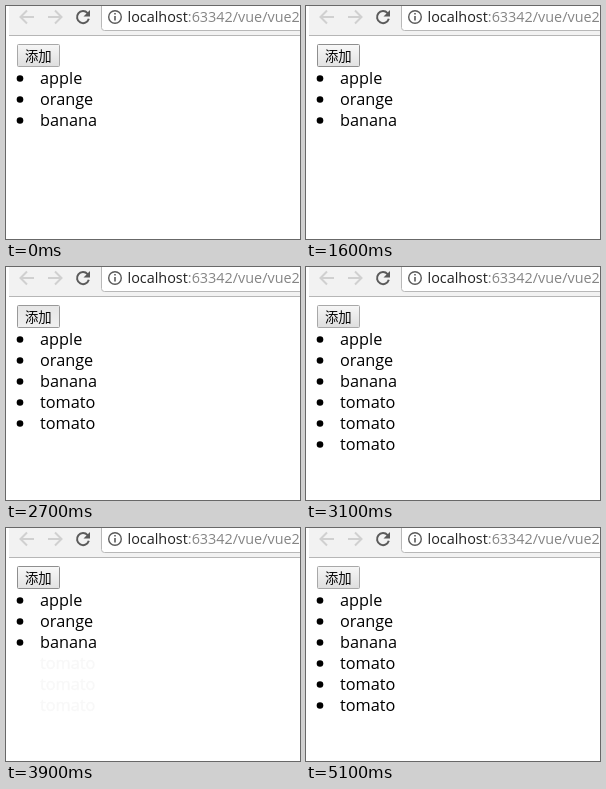
These frames come from a looping animation (294 by 233 pixels, 5.7 s). An HTML page:

```html
<!DOCTYPE html>
<html lang="zh-CN">
<head>
<meta charset="utf-8">
<title>List demo</title>
<style>
  html, body { margin: 0; width: 100%; height: 100%; overflow: hidden; background: #fff; }
  svg { display: block; width: 294px; height: 233px; }
  .url { font: 14.4px "Open Sans", "Noto Sans", sans-serif; }
  .item { font: 16.3px "Open Sans", "Noto Sans", sans-serif; }
  .label { font: 300 13.33px "Noto Sans CJK SC", "Noto Sans CJK", sans-serif; }
  .ghost { fill: #f7f7f7; stroke: #f9f9f9; stroke-width: .6; }
  .line { fill: none; stroke-width: 2; }
</style>
</head>
<body>
<svg viewBox="0 0 294 233">
  <defs>
    <linearGradient id="face" x2="0" y2="1">
      <stop id="faceTop"/>
      <stop id="faceBottom" offset="1"/>
    </linearGradient>
  </defs>

  <rect x="3" width="291" height="29" fill="#f2f2f2"/>
  <circle id="ripple" cx="77" cy="11"/>
  <path d="M3 29.5H294" stroke="#b6b6b6"/>
  <g class="line" stroke="#d0d0d0">
    <path d="M28 11H15M21 4.5L14.5 11L21 17.5"/>
    <path d="M42 11H55M49 4.5L55.5 11L49 17.5"/>
  </g>
  <path class="line" stroke="#5a5a5a" d="M81.6 7.2A6 6 0 1 0 82.8 12.8"/>
  <path fill="#5a5a5a" d="M84 4V10.5H77.5Z"/>
  <rect x="95.5" y="-6.5" width="210" height="31" rx="3" fill="#fff" stroke="#b8b8b8"/>
  <circle cx="109" cy="11" r="6.3" fill="none" stroke="#5a5a5a" stroke-width="1.4"/>
  <path d="M109 10V14.5M109 7V8.6" stroke="#5a5a5a" stroke-width="1.6"/>
  <text class="url" x="121.5" y="16" fill="#222">localhost<tspan fill="#858585">:63342/vue/vue2</tspan></text>

  <rect id="button" x="11.5" y="38.5" width="42" height="22" rx="1" fill="url(#face)"/>
  <text class="label" x="19" y="54.5">添加</text>
  <g id="list"></g>
</svg>
<script>
  const LOOP = 5700, FIRST_BASELINE = 78, ROW = 21;
  const byId = id => document.getElementById(id);

  // Each track is a list of [start time, value]; values hold until the next step.
  const rippleTrack = [
    [0, null], [600, [12, '#e4e4e4']], [800, [14, '#dedede']], [900, [16, '#dadada']],
    [1000, [16.5, '#dadada']], [1100, null],
    [3400, [12, '#e4e4e4']], [3600, [16, '#dadada']], [3700, null]
  ];
  const buttonTrack = [
    [0, 'normal'], [1600, 'hover'], [1800, 'pressed'], [2000, 'hover'], [2300, 'pressed'],
    [2400, 'hover'], [2700, 'pressed'], [2900, 'hover'], [3100, 'normal'],
    [3900, 'hover'], [4100, 'pressed'], [4200, 'hover'], [4400, 'pressed'],
    [4500, 'hover'], [4900, 'pressed'], [5000, 'hover'], [5100, 'normal']
  ];
  const countTrack = [
    [0, 3], [2000, 4], [2400, 5], [2900, 6], [3700, 3], [4200, 4], [4500, 5], [5000, 6]
  ];
  const buttonLooks = {
    normal: ['#f6f6f6', '#dedede', '#a8a8a8'],
    hover: ['#f8f8f8', '#e2e2e2', '#8e8e8e'],
    pressed: ['#e6e6e6', '#f0f0f0', '#999']
  };

  const valueAt = (track, t) => track.filter(([start]) => start <= t).pop()[1];

  const words = ['apple', 'orange', 'banana', 'tomato', 'tomato', 'tomato'];
  byId('list').innerHTML = words.map((word, i) => {
    const y = FIRST_BASELINE + i * ROW;
    return `<g><circle cx="14" cy="${y - 5.5}" r="3.3"/><text class="item" x="34" y="${y}">${word}</text></g>`;
  }).join('');
  const rows = [...byId('list').children];

  function draw(t) {
    const ripple = valueAt(rippleTrack, t);
    byId('ripple').setAttribute('r', ripple ? ripple[0] : 0);
    byId('ripple').setAttribute('fill', ripple ? ripple[1] : 'none');

    const [top, bottom, border] = buttonLooks[valueAt(buttonTrack, t)];
    byId('faceTop').setAttribute('stop-color', top);
    byId('faceBottom').setAttribute('stop-color', bottom);
    byId('button').setAttribute('stroke', border);

    const count = valueAt(countTrack, t);
    rows.forEach((row, i) => {
      const shown = i < count;
      const faint = !shown && t >= 3700;
      row.style.display = shown || faint ? '' : 'none';
      row.firstChild.style.display = shown ? '' : 'none';
      row.lastChild.classList.toggle('ghost', faint);
    });
  }

  const begin = performance.now();
  function tick() {
    draw((performance.now() - begin) % LOOP);
    requestAnimationFrame(tick);
  }
  tick();
</script>
</body>
</html>
```
